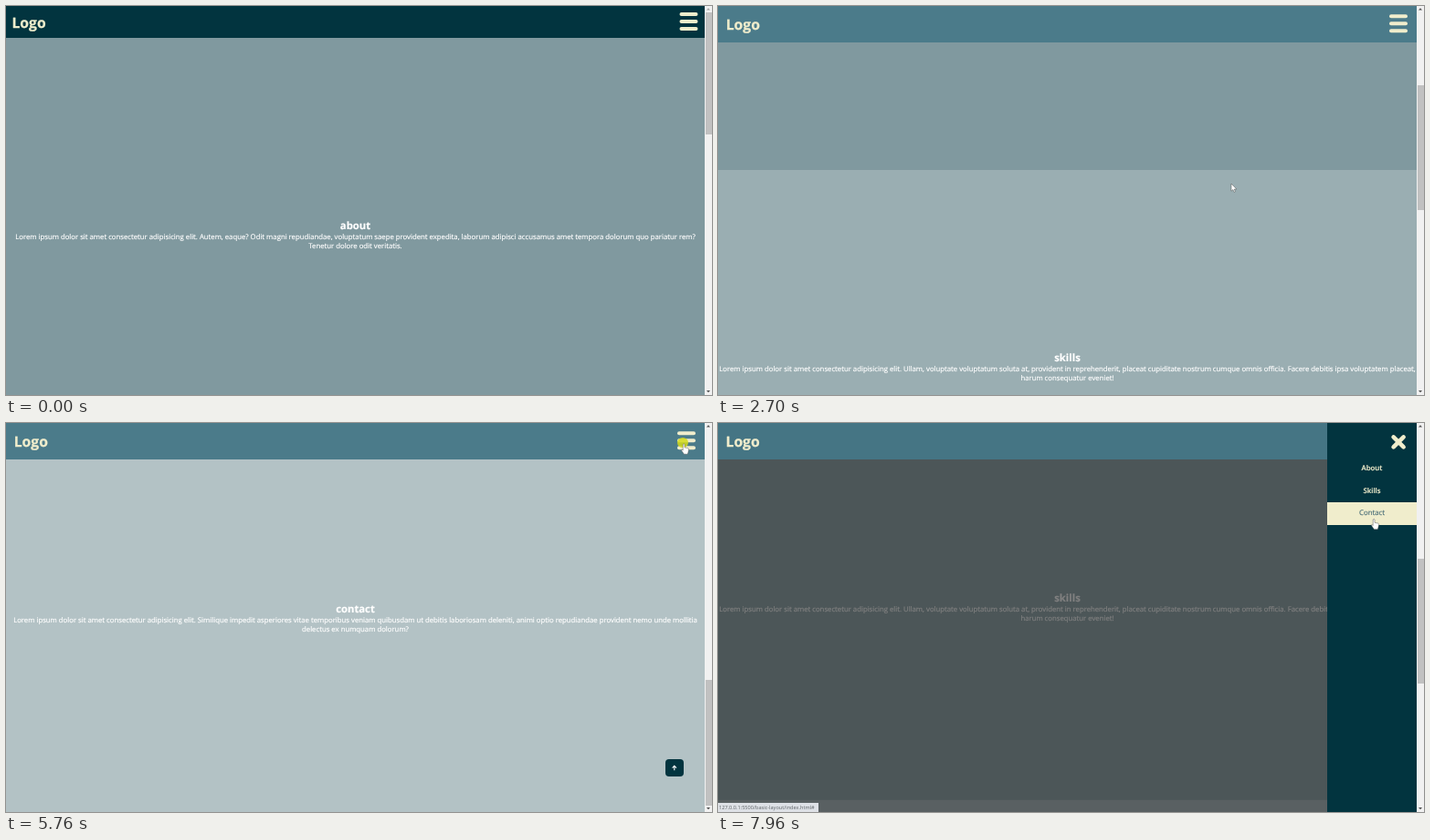
Animation, 773 px wide and 427 px high, one loop 8 s. Source, as an HTML page:

```html
<!DOCTYPE html>
<html lang="en">
<head>
<meta charset="utf-8">
<title>Basic layout</title>
<style>
  html, body { margin: 0; width: 100%; height: 100%; overflow: hidden; }
  body { font: 7.75px/10px 'Open Sans', sans-serif; text-rendering: geometricPrecision; white-space: nowrap; -webkit-text-stroke: .18px; }
  div, section, svg, header, nav, a, h2, p { position: absolute; margin: 0; }
  #stage { width: 773px; height: 427px; overflow: hidden; background: #b3c2c5; }
  #page { top: 35px; width: 765px; }
  section { width: 765px; height: 428px; color: #fff; text-align: center; }
  section h2 { top: 198.7px; width: 100%; font-size: 11.3px; line-height: 15px; }
  section p { top: 213.7px; width: 100%; line-height: 10.5px; }
  #about { background: #80999f; }
  #skills { top: 428px; background: #9aaeb2; }
  #contact { top: 856px; height: 430px; background: #b3c2c5; }
  #toTop { left: 722px; top: 369px; width: 19.5px; height: 19px; border-radius: 4px; background: #02343f; }
  #overlay { width: 765px; height: 427px; background: rgba(0, 0, 0, .5); }
  header { width: 765px; color: #f0edcc; }
  #logo { font-weight: 700; font-size: 15.7px; line-height: 20px; -webkit-text-stroke: .25px; }
  #burger div { width: 20px; height: 4px; border-radius: 2px; background: #f0edcc; }
  nav { left: 667px; width: 98px; height: 427px; background: #02343f; }
  nav a { width: 98px; height: 24.5px; line-height: 24.5px; text-align: center; font-weight: 600; font-size: 7.8px; color: #f0edcc; }
  nav a.hover { background: #f0edcc; color: #4b6f78; font-weight: 400; }
  #status { top: 417px; width: 110px; height: 10px; background: #dee1e6; color: #5f6468; font-size: 5.6px; text-indent: 1px; -webkit-text-stroke: 0; }
  #bar { left: 765px; width: 8px; height: 427px; background: #f1f1f1; }
  #thumb { left: .7px; width: 6.9px; background: #c1c1c1; }
  #click { left: 735px; top: 16px; width: 12px; height: 11px; border-radius: 50%; background: #d4da1a; }
  svg { overflow: visible; }
</style>
</head>
<body>
<div id="stage">
  <div id="page">
    <section id="about"><h2>about</h2>
      <p>Lorem ipsum dolor sit amet consectetur adipisicing elit. Autem, eaque? Odit magni repudiandae, voluptatum saepe provident expedita, laborum adipisci accusamus amet tempora dolorum quo pariatur rem?<br>Tenetur dolore odit veritatis.</p></section>
    <section id="skills"><h2>skills</h2>
      <p>Lorem ipsum dolor sit amet consectetur adipisicing elit. Ullam, voluptate voluptatum soluta at, provident in reprehenderit, placeat cupiditate nostrum cumque omnis officia. Facere debitis ipsa voluptatem placeat,<br>harum consequatur eveniet!</p></section>
    <section id="contact"><h2>contact</h2>
      <p>Lorem ipsum dolor sit amet consectetur adipisicing elit. Similique impedit asperiores vitae temporibus veniam quibusdam ut debitis laboriosam deleniti, animi optio repudiandae provident nemo unde mollitia<br>delectus ex numquam dolorum?</p></section>
  </div>
  <div id="toTop"><svg width="20" height="19" fill="none" stroke="#fff" stroke-width="1.1"><path d="M9.8 12.3V7.6M7.6 9.6l2.2-2.2 2.2 2.2"/></svg></div>
  <div id="overlay"></div>
  <header id="header">
    <div id="logo">Logo</div>
    <div id="burger"><div></div><div style="top:8px"></div><div style="top:16px"></div></div>
  </header>
  <div id="click"></div>
  <nav id="menu">
    <svg width="98" height="40" stroke="#f0edcc" stroke-width="4.6" stroke-linecap="round"><path d="M72.6 15.4l11 11m0-11l-11 11"/></svg>
    <a style="top:38px">About</a><a style="top:62.5px">Skills</a><a style="top:87px">Contact</a>
  </nav>
  <div id="status">127.0.0.1:5500/basic-layout/index.html#</div>
  <div id="bar">
    <svg width="8" height="427"><path id="up" d="M2 4.5h4l-2-2.2z"/><path d="M2 422h4l-2 2.2z" fill="#505050"/></svg>
    <div id="thumb"></div>
  </div>
  <svg id="cursor" width="10" height="14" fill="#fff" stroke="#444" stroke-width=".45" stroke-linejoin="round">
    <path id="arrow" d="M0 0v8.2l1.9-1.7 1.2 2.8 1.3-.6-1.2-2.7h2.6z"/>
    <path id="hand" d="M1.7 1q.9-1.6 1.8 0v3.3l3.6.8q1.1.3 1 1.5l-.7 3.2-.6 1.9H2.9L.3 8.1q-1.2-1.6.2-1.6l1.2.9z"/>
  </svg>
</div>
<script>
const LOOP = 8000, HEADER = 35;
const $ = id => document.getElementById(id);
const links = document.querySelectorAll('nav a');

const progress = (t, start, length) => Math.min(1, Math.max(0, (t - start) / length));
const easeInOut = u => (1 - Math.cos(Math.PI * u)) / 2;
const easeOut = u => 1 - (1 - u) ** 2;
const mix = (a, b, u) => a + (b - a) * u;

// Each scroll: start, duration, distance
const scrolls = [[1645, 735, 283], [3050, 750, 448], [4310, 510, 162], [6740, 830, -893], [7650, 596, 893]];
// Header switches between in-flow (-1) and pinned (1)
const pins = [[1810, 1], [7465, -1], [7725, 1]];
// Pointer: time, x, y
const pointer = [[850, 598, -14], [1210, 562, 185], [1360, 562, 185], [1440, 562, 188], [1600, 562, 188],
  [1680, 562, 189.5], [2380, 562, 195], [4940, 562, 195.5], [5100, 559, 207], [5700, 742, 22.5],
  [5950, 742, 22.5], [6390, 717, 54.5], [6980, 717, 54.5], [7450, 718, 105]];

function pointerAt(t) {
  const i = pointer.findIndex(k => k[0] > t);
  if (i < 1) return pointer.at(i).slice(1);
  const [a, b] = [pointer[i - 1], pointer[i]];
  const u = easeInOut((t - a[0]) / (b[0] - a[0]));
  return [mix(a[1], b[1], u), mix(a[2], b[2], u)];
}

function move(id, x, y) { $(id).style.transform = `translate(${x}px, ${y}px)`; }
function show(id, visible) { $(id).style.display = visible ? '' : 'none'; }

function draw(t) {
  const scroll = scrolls.reduce((s, [at, length, d]) => s + d * easeInOut(progress(t, at, length)), 0);
  const pinned = scroll > HEADER;
  const p = Math.min(1, Math.max(0, pins.reduce((s, [at, d]) => s + d * easeOut(progress(t, at, 330)), 0)));
  move('page', 0, -scroll);
  move('header', 0, pinned ? 0 : -scroll);
  $('header').style.height = mix(35.4, 40, p) + 'px';
  $('header').style.background = `rgb(${mix(2, 75, p)}, ${mix(52, 123, p)}, ${mix(63, 138, p)})`;
  move('logo', 6.5 + 2.2 * p, 7.5 + 2.5 * p);
  move('burger', 737.5 - 2.5 * p, 7 + 2.2 * p);
  show('toTop', scroll > 400);

  $('thumb').style.top = 7 + (pinned ? (scroll - HEADER) * .3209 : scroll * .3138) + 'px';
  $('thumb').style.height = (pinned ? 137.5 : 133.7) + 'px';
  $('up').style.fill = scroll ? '#505050' : '#a3a3a3';

  const open = easeOut(progress(t, 5800, 400));
  $('overlay').style.opacity = open;
  move('menu', 98 * (1 - open), 0);

  const [x, y] = pointerAt(t);
  const row = open === 1 ? Math.floor((y - 38) / 24.5) : -1;
  links.forEach((a, i) => a.classList.toggle('hover', i === row));
  $('status').style.opacity = progress(t, 6510, 100);

  const hand = t > 5640;
  move('cursor', hand ? x - 2.5 : x, y);
  show('hand', hand);
  show('arrow', !hand);
  $('click').style.opacity = t < 5720 ? 0 : .85 * (1 - progress(t, 5800, 120));
}

const start = performance.now();
function tick(now) {
  draw(Math.max(0, now - start) % LOOP);
  requestAnimationFrame(tick);
}
draw(0);
requestAnimationFrame(tick);
</script>
</body>
</html>
```
